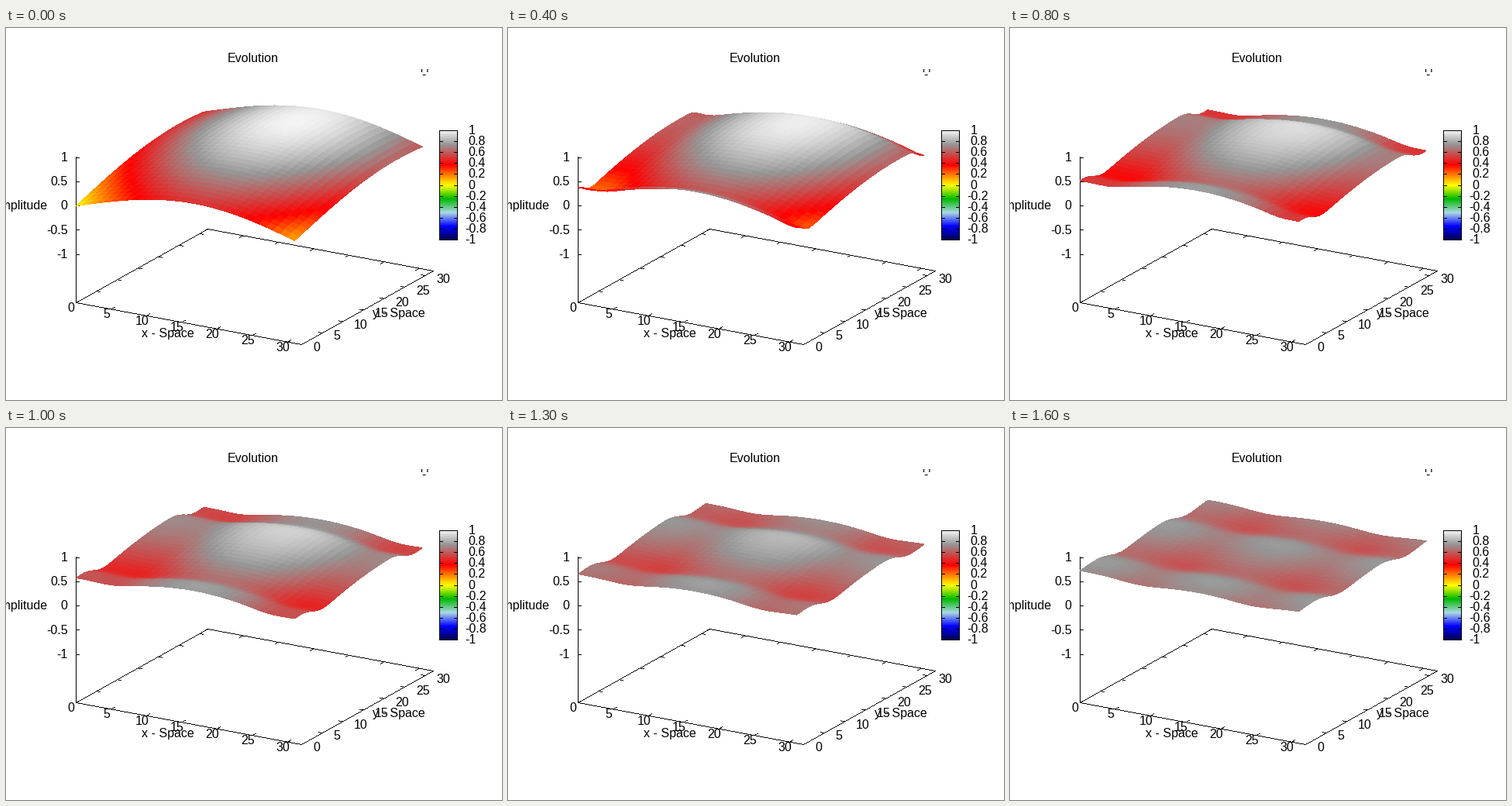
Animation, 640 px wide and 480 px high, one loop 1700 ms. Source, as a matplotlib script:

```python
import numpy as np
import matplotlib.pyplot as plt
from matplotlib.animation import FuncAnimation
from matplotlib.collections import PolyCollection
from matplotlib.colors import LinearSegmentedColormap, Normalize

W, H, DPI = 640, 480, 100
N = 32                     # grid points per side
FRAMES, STEP_MS = 17, 100
COURANT = 0.5

plt.rcParams["font.family"] = "Liberation Sans"
plt.rcParams["font.size"] = 16 * 72 / DPI

ORIGIN = np.array([90.0, 354.0])
X_EDGE = np.array([291.0, 54.0])     # whole x axis on screen
Y_EDGE = np.array([170.0, -95.0])    # whole y axis on screen
ZERO_LIFT, Z_UNIT = 125.0, 62.5

PALETTE = [(-1, (0, 0, 80)), (-0.75, (0, 0, 255)), (-0.5, (173, 216, 230)),
           (-0.25, (0, 185, 0)), (0, (255, 255, 0)), (0.375, (255, 0, 0)),
           (0.75, (150, 150, 150)), (1, (243, 243, 243))]
cmap = LinearSegmentedColormap.from_list(
    "levels", [((v + 1) / 2, np.array(c) / 255) for v, c in PALETTE], N=512)
norm = Normalize(-1, 1)


def floor_point(x, y):
    return ORIGIN + X_EDGE * x / N + Y_EDGE * y / N


def average(a):
    """Mean of the four neighbours on the periodic grid."""
    return sum(np.roll(a, s, axis) for s in (1, -1) for axis in (0, 1)) / 4


def slope(a, axis):
    return COURANT / 2 * (np.roll(a, -1, axis) - np.roll(a, 1, axis))


def evolve():
    """Wave equation as a first-order system, stepped with the Lax scheme."""
    y, x = np.mgrid[0:N, 0:N]
    u = (np.sin(3 * x / N) + np.sin(2 * y / N)) / 2
    p, q = np.zeros_like(u), np.zeros_like(u)
    states = [u]
    for _ in range(FRAMES - 1):
        u, p, q = (average(u) + slope(p, 1) + slope(q, 0),
                   average(p) + slope(u, 1),
                   average(q) + slope(u, 0))
        states.append(u)
    return states


def corners(a):
    """Four corners of every cell, far rows first."""
    cells = np.stack([a[:-1, :-1], a[:-1, 1:], a[1:, 1:], a[1:, :-1]], axis=2)
    return cells[::-1].reshape((-1,) + cells.shape[2:])


def surface(u):
    y, x = np.mgrid[0:N, 0:N]
    pts = floor_point(x[..., None], y[..., None])
    pts[..., 1] -= ZERO_LIFT + Z_UNIT * u
    return corners(pts), cmap(norm(corners(u).mean(axis=1)))


fig = plt.figure(figsize=(W / DPI, H / DPI), dpi=DPI, facecolor="white")
ax = fig.add_axes([0, 0, 1, 1])
ax.axis("off")
canvas = np.ones((H, W, 3))


def line(p, q):
    """Hard one-pixel line."""
    p, q = np.asarray(p, float), np.asarray(q, float)
    steps = int(np.ceil(np.abs(q - p).max())) + 1
    x, y = np.floor(np.linspace(p, q, steps) + 0.5).astype(int).T
    canvas[y, x] = 0


def label(x, y, text, ha="center"):
    ax.text(x, y + 5.5, text, ha=ha, va="baseline", color="black")


def draw_box():
    a, b, c, d = (floor_point(*p) for p in ((0, 0), (N, 0), (N, N), (0, N)))
    for p, q in ((a, b), (b, c), (c, d), (d, a), (a, (90, 166))):
        line(p, q)
    x_tick = 5 * Y_EDGE / np.hypot(*Y_EDGE)
    y_tick = 5 * X_EDGE / np.hypot(*X_EDGE)
    for i in range(7):
        t = 5 * i
        for start, tick in ((floor_point(t, 0), x_tick),
                            (floor_point(t, N), -x_tick),
                            (floor_point(0, t), y_tick),
                            (floor_point(N, t), -y_tick)):
            line(start, start + tick)
        label(83.5 + 45.6 * i, 360 + 8.45 * i, str(t))
        label(395.5 + 26.6 * i, 411 - 14.6 * i, str(t), "left")
    for v in (1, 0.5, 0, -0.5, -1):
        y = 229 - Z_UNIT * v
        line((90, y), (94, y))
        label(79, y - 0.5, f"{v:g}", "right")


def draw_colorbar():
    left, right, top, bottom = 559, 582, 132, 273
    levels = np.linspace(1, -1, bottom - top + 1)
    canvas[top:bottom + 1, left:right + 1] = cmap(norm(levels))[:, None, :3]
    for x in (left, right):
        line((x, top), (x, bottom))
    for y in (top, bottom):
        line((left, y), (right, y))
    for i in range(11):
        v = (5 - i) / 5
        y = top + (bottom - top) * i / 10
        line((left, y), (left + 4, y))
        line((right - 4, y), (right, y))
        label(596 if v >= 0 else 591.5, y - 1, f"{v:g}", "left")


draw_box()
draw_colorbar()
label(318.5, 38, "Evolution")
label(534, 58.5, "'-'", "left")
label(54, 228, "Amplitude", "right")
label(208.5, 393.5, "x - Space")
label(506.5, 367.5, "y - Space")

# integer coordinates are pixel centres
ax.imshow(canvas, extent=(-0.5, W - 0.5, H - 0.5, -0.5), aspect="auto",
          interpolation="nearest", zorder=0)

states = evolve()
mesh = PolyCollection([], antialiaseds=False, linewidths=0, zorder=2)
ax.add_collection(mesh)
ax.set_xlim(-0.5, W - 0.5)
ax.set_ylim(H - 0.5, -0.5)


def update(frame):
    polys, colors = surface(states[frame])
    mesh.set_verts(polys)
    mesh.set_facecolor(colors)
    return [mesh]


anim = FuncAnimation(fig, update, frames=FRAMES, interval=STEP_MS,
                     repeat=True, repeat_delay=0)
plt.show()
```
